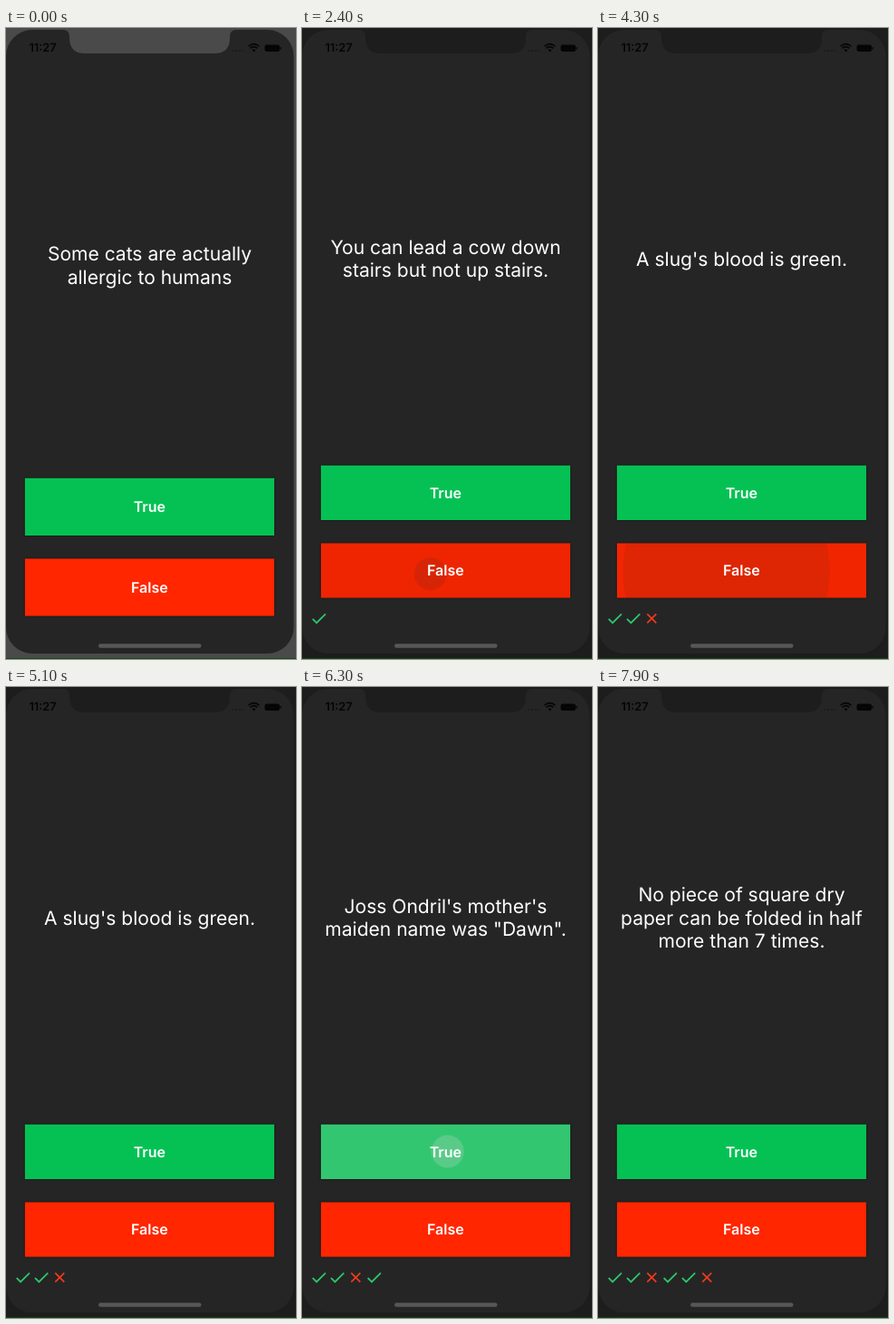
An HTML page that plays this animation: 320x695 px, repeating every 8 s.

```html
<!DOCTYPE html>
<html lang="en">
<head>
<meta charset="utf-8">
<title>True or false quiz</title>
<style>
html, body { margin: 0; width: 100%; height: 100%; overflow: hidden; background: #1d1d1d; }
#stage { display: block; width: 320px; height: 695px; font-family: Inter, "Noto Sans", sans-serif; font-optical-sizing: none; }
text { text-anchor: middle; text-rendering: geometricPrecision; }
.button { filter: drop-shadow(0 0.5px 1px rgba(0, 0, 0, .55)); }
#question { font-size: 21.05px; fill: #fff; }
.label { font-size: 16px; font-weight: 600; fill: #fff; }
#marks { fill: none; stroke-width: 1.7; }
</style>
</head>
<body>
<svg id="stage" viewBox="0 0 320 695">
  <rect id="bezel" width="320" height="695"/>
  <rect y="2" width="317.5" height="687" rx="29" fill="#252525"/>
  <path id="notch" d="M64 0V2Q70 3 70 9V11Q70 28 87 28H230Q247 28 247 11V9Q247 3 253 2V0Z"/>
  <rect y="694" width="320" height="1" fill="#114a0c"/>
  <g fill="#050505">
    <text x="40.5" y="26.3" font-size="12.8" font-weight="600">11:27</text>
    <g fill="#111">
      <circle cx="250.5" cy="25" r=".8"/><circle cx="254.3" cy="25" r=".8"/>
      <circle cx="258.1" cy="25" r=".8"/><circle cx="261.9" cy="25" r=".8"/>
    </g>
    <path d="M271.5 24.2Q273.5 22.6 275.5 24.2L273.5 26.4Z"/>
    <path d="M269.6 22.3Q273.5 18.9 277.4 22.3M267.6 20.2Q273.5 15.2 279.4 20.2" fill="none" stroke="#050505" stroke-width="1.7"/>
    <rect x="285.5" y="18.5" width="16.5" height="7.5" rx="2.2"/>
    <rect x="302.6" y="20.8" width="1.2" height="3" rx=".6"/>
  </g>
  <rect x="102" y="678.2" width="113.5" height="4.6" rx="2.3" fill="#575757"/>
  <text id="question"></text>
  <g id="buttons"></g>
  <g id="marks"></g>
</svg>
<script>
const LOOP = 8000, STEP = 100;
const $ = id => document.getElementById(id);

const questions = [
  ["Some cats are actually", "allergic to humans"],
  ["You can lead a cow down", "stairs but not up stairs."],
  ["You can legally drink", "alcohol while driving in", "Mississippi."],
  ["A slug's blood is green."],
  ["Joss Ondril's mother's", "maiden name was \"Dawn\"."],
  ["It is illegal to pee in the", "Ocean in Portugal."],
  ["No piece of square dry", "paper can be folded in half", "more than 7 times."]
];

// button: 0 = True, 1 = False; x and y are inside the button
const taps = [
  { down: 845, up: 930, button: 0, x: 148, y: 32, right: true },
  { down: 2300, up: 2450, button: 1, x: 121, y: 34, right: true },
  { down: 4072, up: 4222, button: 1, x: 121, y: 31, right: false },
  { down: 5250, up: 5400, button: 0, x: 137, y: 25, right: true },
  { down: 6200, up: 6350, button: 0, x: 140, y: 30, right: true },
  { down: 7370, up: 7520, button: 1, x: 121, y: 31, right: false }
];
const ANSWER_DELAY = 60, FADE = 350, GROW = 225;

const styles = [
  { label: "True", fill: "#05c153", ink: "#d4d4d4", glow: .22, splash: .24 },
  { label: "False", fill: "#ff2600", ink: "#222", glow: .07, splash: .12 }
];

const clamp = v => Math.max(0, Math.min(1, v));

function ripple(tap, t, { ink, glow, splash }) {
  const held = Math.min(t, tap.up) - tap.down;
  const since = Math.max(0, t - tap.up);
  const start = held * .18;
  const r = start + (160 - start) * (1 - (1 - clamp(since / GROW)) ** 2.5);
  const alpha = clamp(held / 80) * (1 - since / FADE);
  return `<rect width="100%" height="100%" fill="${ink}" opacity="${glow * alpha}"/>
    <circle cx="${tap.x}" cy="${tap.y}" r="${r}" fill="${ink}" opacity="${splash * alpha}"/>`;
}

function button(style, i, t, y, h) {
  const tap = taps.find(p => p.button === i && t >= p.down && t < p.up + FADE);
  return `<g class="button"><svg x="20.7" y="${y}" width="275.4" height="${h}">
    <rect width="100%" height="100%" fill="${style.fill}"/>${tap ? ripple(tap, t, style) : ""}</svg></g>
    <text class="label" x="158.3" y="${y + h / 2 + 5.8}">${style.label}</text>`;
}

function mark(tap, i) {
  const shape = tap.right ? "M-7 .5L-2.6 4.9 7.3-5" : "M-5-5L5 5M5-5L-5 5";
  return `<path d="${shape}" stroke="${tap.right ? "#2bca6c" : "#f23a1a"}" transform="translate(${18.7 + 20.3 * i} 650.3)"/>`;
}

function draw(t) {
  const answered = taps.filter(p => t >= p.up + ANSWER_DELAY);
  const first = !answered.length;
  const lines = questions[answered.length];
  const middle = first ? 262 : 254.6;
  const edge = t < 100 ? "#4a4a4a" : "#1d1d1d";

  $("bezel").setAttribute("fill", edge);
  $("notch").setAttribute("fill", edge);
  $("question").innerHTML = lines.map((line, i) =>
    `<tspan x="158.5" y="${middle + (i - (lines.length - 1) / 2) * 25.5 + 7.1}">${line}</tspan>`).join("");
  $("buttons").innerHTML = styles.map((style, i) =>
    button(style, i, t, first ? 495.6 + 88.7 * i : 481.6 + 85.7 * i, first ? 63.5 : 60.5)).join("");
  $("marks").innerHTML = answered.map(mark).join("");
}

const begin = performance.now();
function tick() {
  const t = (performance.now() - begin) % LOOP;
  draw(Math.floor(t / STEP) * STEP);
  requestAnimationFrame(tick);
}
tick();
</script>
</body>
</html>
```
